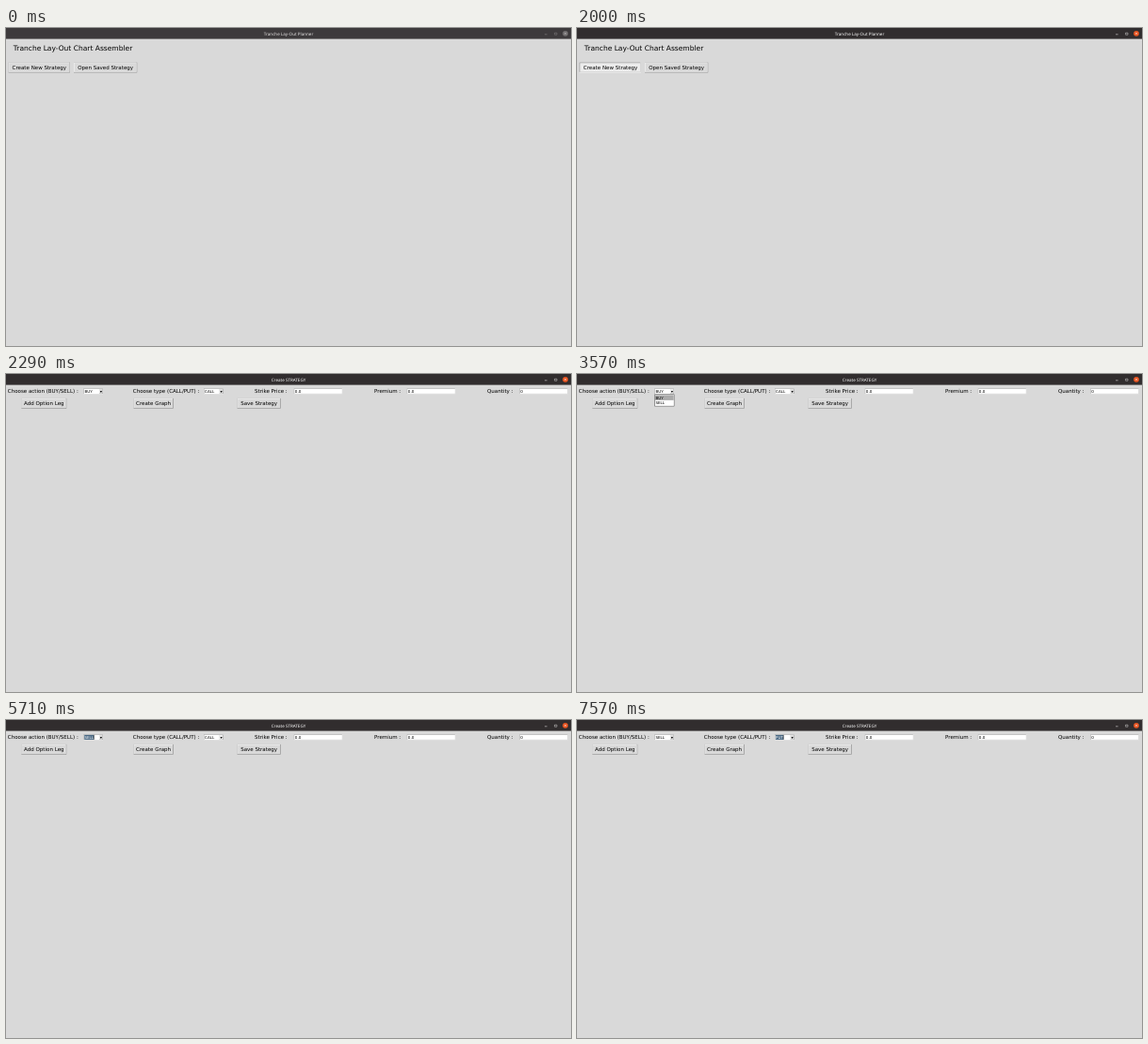
An HTML page with a canvas that plays this animation: 600x338 px, repeating every 8 s.

```html
<!DOCTYPE html>
<html lang="en">
<head>
<meta charset="utf-8">
<title>Strategy form</title>
<style>
  html, body { margin: 0; width: 100%; height: 100%; overflow: hidden; background: #d9d9d9; }
  canvas { display: block; }
</style>
</head>
<body>
<canvas id="stage" width="600" height="338"></canvas>
<script>
const c = document.getElementById('stage').getContext('2d');
const LOOP = 8000;
const BG = '#d9d9d9', LIGHT = '#f4f4f4', DARK = '#888', HOVER = '#ececec', SELECT = '#4a6984';

function rect(x, y, w, h, color) {
  c.fillStyle = color;
  c.fillRect(x, y, w, h);
}

function text(s, x, y, size = 5.53, color = '#000', align = 'left', font = '"DejaVu Sans", sans-serif') {
  c.font = `${size}px ${font}`;
  c.textRendering = 'geometricPrecision';
  c.textAlign = align;
  c.fillStyle = color;
  c.fillText(s, x, y);
}

function line(color, width, ...p) {
  c.strokeStyle = color;
  c.lineWidth = width;
  c.beginPath();
  for (let i = 0; i < p.length; i += 2) c.lineTo(p[i], p[i + 1]);
  c.stroke();
}

// Box with a lit top-left edge and a shaded bottom-right edge
function bevel(x, y, w, h, fill, lit, shade, edge = 0.6) {
  rect(x, y, w, h, shade);
  rect(x, y, w - edge, h - edge, lit);
  rect(x + edge, y + edge, w - 2 * edge, h - 2 * edge, fill);
}

function button(label, x, y, w, state = '') {
  const down = state === 'down';
  bevel(x, y, w, 10.8, state ? HOVER : BG, down ? DARK : LIGHT, down ? LIGHT : DARK);
  const push = down ? 0.3 : 0;
  text(label, x + w / 2 + push, y + 7.1 + push, 5.53, '#000', 'center');
}

function titleBar(title, active) {
  rect(0, 0, 600, 11.6, active ? '#312d2e' : '#3d3a3c');
  const ink = active ? '#fff' : '#c9c7c8';
  const icon = active ? '#d8d6d6' : '#858283';
  text(title, 300, 7.6, 4.55, active ? ink : '#e6e4e4', 'center', 'bold 4.55px "Noto Sans", "Open Sans", sans-serif'.slice(12));
  line(icon, 0.6, 572, 6.8, 574.6, 6.8);
  line(icon, 0.5, 582.6, 5.2, 585, 5.2, 585, 7.2, 582.6, 7.2, 582.6, 5);
  c.fillStyle = active ? '#e95420' : '#716e6f';
  c.beginPath();
  c.arc(594, 5.8, 2.9, 0, 7);
  c.fill();
  line(ink, 0.5, 593, 4.8, 595, 6.8);
  line(ink, 0.5, 595, 4.8, 593, 6.8);
}

function mainWindow(active, state) {
  rect(0, 0, 600, 338, BG);
  titleBar('Tranche Lay-Out Planner', active);
  text('Tranche Lay-Out Chart Assembler', 7.8, 23.6, 7.52);
  button('Create New Strategy', 2.6, 36.6, 65.4, state);
  button('Open Saved Strategy', 72, 36.6, 67.2);
}

function entry(value, x) {
  bevel(x, 15.4, 51.5, 5.9, '#fff', '#999', '#e8e8e8', 0.4);
  text(value, x + 1, 19.8, 4.1);
}

function combo(x, width, value, { selected, cursor, hover }) {
  bevel(x, 15.4, width + 4, 6, '#fff', '#999', '#e8e8e8', 0.4);
  c.font = '4.06px "DejaVu Sans", sans-serif';
  const w = c.measureText(value).width;
  if (selected) rect(x + 0.9, 15.9, w + 0.4, 5, SELECT);
  text(value, x + 1.1, 19.8, 4.06, selected ? '#fff' : '#000');
  if (cursor) rect(x + w + 1, 15.9, 0.5, 5, '#000');
  const ax = x + width;
  bevel(ax, 15.8, 3.6, 5.2, hover ? HOVER : BG, LIGHT, DARK, 0.4);
  c.fillStyle = '#000';
  c.beginPath();
  c.moveTo(ax + 0.7, 18);
  c.lineTo(ax + 2.9, 18);
  c.lineTo(ax + 1.8, 19.9);
  c.fill();
}

function popup(x, items, picked) {
  rect(x, 21.6, 21, 12.7, '#333');
  rect(x + 0.4, 22, 20.2, 11.9, '#fff');
  items.forEach((item, i) => {
    const y = 22.3 + i * 5.7;
    if (i === picked) rect(x + 0.6, y, 19.8, 5.6, '#ababab');
    text(item, x + 1.1, y + 4.2, 4.06);
  });
}

function formWindow(t) {
  const within = (a, b) => t >= a && t < b;
  const actionOpen = within(3570, 4290), typeOpen = within(5860, 6710);
  rect(0, 0, 600, 338, BG);
  titleBar('Create STRATEGY', true);

  text('Choose action (BUY/SELL) :', 1.8, 20.2);
  text('Choose type (CALL/PUT) :', 134.8, 20.2);
  text('Strike Price :', 264, 20.2);
  text('Premium :', 391, 20.2);
  text('Quantity :', 511, 20.2);
  entry('0.0', 305.8);
  entry('0.0', 425.8);
  entry('0', 545.3);
  button('Add Option Leg', 16.4, 25.9, 47.8);
  button('Create Graph', 135.6, 25.9, 42);
  button('Save Strategy', 245.6, 25.9, 46);

  combo(82.3, 16.8, t < 4290 ? 'BUY' : 'SELL', {
    selected: within(4290, 6710),
    cursor: within(4290, 4860) || within(5140, 5860),
    hover: actionOpen
  });
  combo(210, 16.8, t < 6710 ? 'CALL' : 'PUT', {
    selected: t >= 6710,
    cursor: within(6710, 7290) || t >= 7570,
    hover: within(5710, 6710)
  });
  if (actionOpen) popup(82.3, ['BUY', 'SELL'], t < 4000 ? 0 : 1);
  if (typeOpen) popup(210, ['CALL', 'PUT'], t < 6140 ? 0 : 1);
}

function draw(now) {
  const t = now % LOOP;
  if (t < 2140) {
    mainWindow(t >= 2000, t < 1290 ? '' : t < 2000 ? 'hover' : 'down');
  } else if (t < 2290) {
    // The new window opens slightly smaller than the screen
    mainWindow(false, '');
    c.save();
    c.translate(6, 6.7);
    c.scale(0.98, 0.98);
    formWindow(t);
    c.strokeStyle = 'rgba(0,0,0,.35)';
    c.lineWidth = 0.6;
    c.strokeRect(0, 0, 600, 340);
    c.restore();
  } else {
    formWindow(t);
  }
  requestAnimationFrame(draw);
}
requestAnimationFrame(draw);
</script>
</body>
</html>
```
